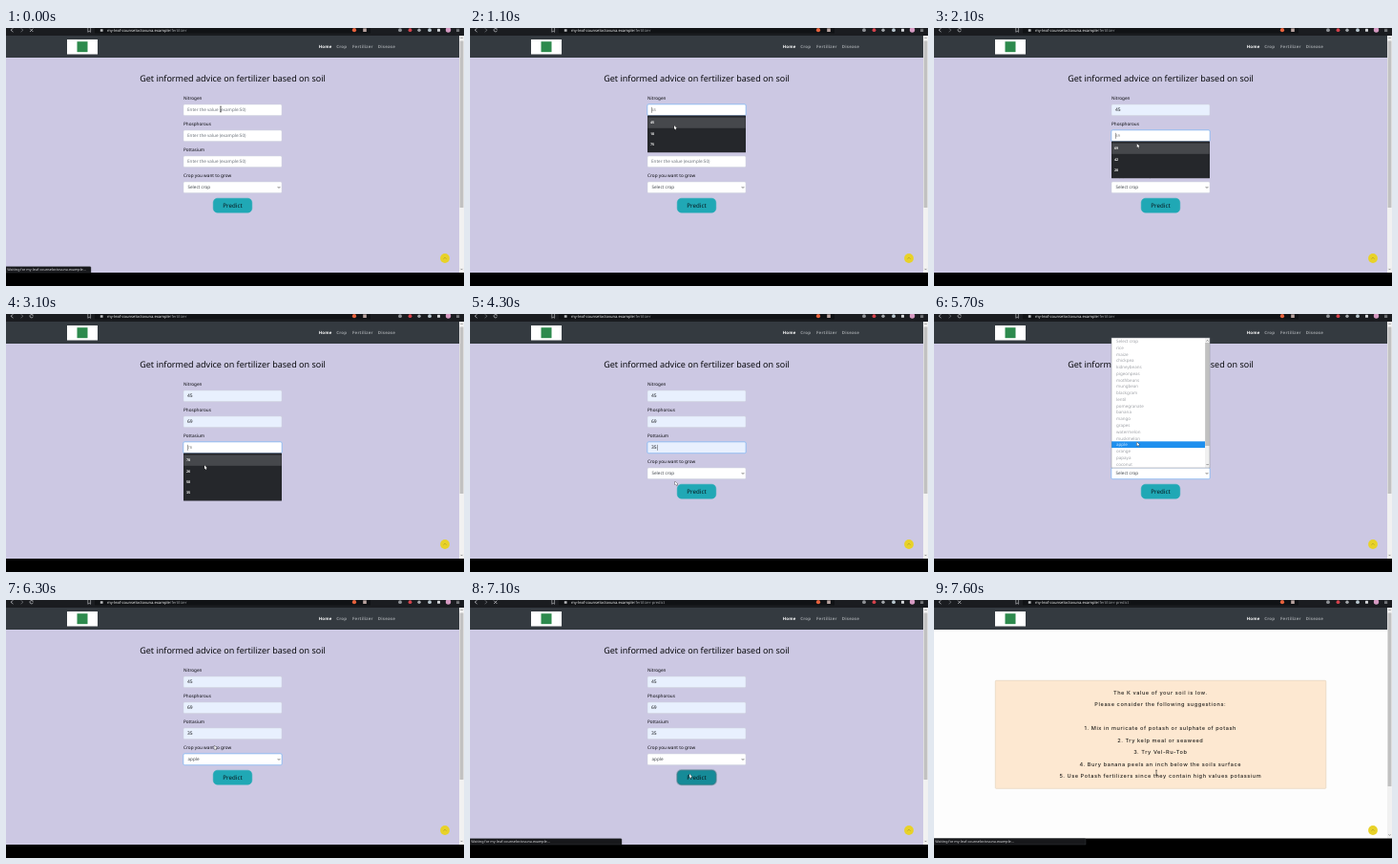
An HTML page with a canvas for the animation above (8 s loop, 480x270 px).

```html
<!DOCTYPE html>
<html lang="en">
<head>
<meta charset="utf-8">
<title>Fertilizer advice</title>
<style>
  html, body { margin: 0; width: 100%; height: 100%; overflow: hidden; background: #000; }
  canvas { display: block; width: 100vw; height: 100vh; }
</style>
</head>
<body>
<canvas id="stage"></canvas>
<script>
const W = 480, H = 270, LOOP = 8000, STEP = 100;
const SANS = '"Noto Sans", "Open Sans", sans-serif';
const WIDE = 'Inter, Roboto, sans-serif';
const HOST = 'my-leaf-counselor.tovuna.example';
const NAV_TOP = 8, PAGE_TOP = 31, PAGE_END = 256, RESULT_END = 249.5;

const canvas = document.getElementById('stage');
const ctx = canvas.getContext('2d');

// Moments at which the state of the page changes
const LOADED = 500, SELECT_FOCUS = 4900, SELECT_OPEN = 5000, CHOSEN = 6000;
const SELECT_BLUR = 6500, PRESSED = 6800, WAITING = 6900, RESULT = 7200;

const fields = [
  { label: 'Nitrogen', y: 80, open: 700, pick: 1400, blur: 1700, value: '45', options: ['45', '10', '75'] },
  { label: 'Phosphorous', y: 107, open: 1800, pick: 2300, blur: 2700, value: '69', options: ['69', '42', '20'] },
  { label: 'Pottasium', y: 134, open: 2800, pick: 3800, blur: 4900, value: '35', options: ['78', '26', '50', '35'] }
];

const crops = ('Select crop,rice,maize,chickpea,kidneybeans,pigeonpeas,mothbeans,mungbean,' +
  'blackgram,lentil,pomegranate,banana,mango,grapes,watermelon,muskmelon,apple,' +
  'orange,papaya,coconut').split(',');

const advice = [
  [97, 'The K value of your soil is low.'],
  [109.6, 'Please consider the following suggestions:'],
  [134.6, '1. Mix in muricate of potash or sulphate of potash'],
  [147.1, '2. Try kelp meal or seaweed'],
  [159.6, '3. Try Vel-Ru-Tob'],
  [172.1, '4. Bury banana peels an inch below the soils surface'],
  [184.6, '5. Use Potash fertilizers since they contain high values potassium']
];

// Pointer path: time, x, y
const path = [
  [0, 225, 85], [600, 225, 85], [1100, 214, 102], [1400, 213, 99], [1800, 214, 112],
  [2300, 212, 126], [2800, 212, 139], [3100, 208, 158.3], [3700, 206, 187], [3900, 206, 187],
  [4300, 215, 175], [4700, 222, 167], [5000, 222, 167], [5300, 214, 95], [5700, 212.6, 134],
  [6100, 212, 136], [6600, 230, 182], [7200, 230, 182], [7600, 233, 181]
];

function pointer(t) {
  const i = path.findIndex(p => p[0] > t);
  if (i < 0) return path[path.length - 1].slice(1);
  const [t0, x0, y0] = path[i - 1], [t1, x1, y1] = path[i];
  const k = (t - t0) / (t1 - t0), e = k * k * (3 - 2 * k);
  return [x0 + (x1 - x0) * e, y0 + (y1 - y0) * e];
}

const clamp = (v, max) => Math.max(0, Math.min(max, v));

function rect(x, y, w, h, fill) {
  ctx.fillStyle = fill;
  ctx.fillRect(x, y, w, h);
}

function box(x, y, w, h, r, fill, stroke, line = 0.5) {
  ctx.beginPath();
  ctx.roundRect(x, y, w, h, r);
  ctx.fillStyle = fill;
  ctx.fill();
  if (!stroke) return;
  ctx.strokeStyle = stroke;
  ctx.lineWidth = line;
  ctx.stroke();
}

function dot(x, y, r, fill) {
  ctx.beginPath();
  ctx.arc(x, y, r, 0, 7);
  ctx.fillStyle = fill;
  ctx.fill();
}

function lines(points, color, width, close) {
  ctx.beginPath();
  points.forEach(([x, y]) => ctx.lineTo(x, y));
  if (close) ctx.closePath();
  ctx.strokeStyle = color;
  ctx.lineWidth = width;
  ctx.stroke();
}

// Small arrow head centred on x, y; negative size points up
function chevron(x, y, size, color) {
  const w = Math.abs(size);
  lines([[x - w, y - size / 2], [x, y + size / 2], [x + w, y - size / 2]], color, 0.7);
}

// y is the middle of the letters
function text(s, x, y, size, color, { align = 'left', weight = 400, family = SANS, space = 0 } = {}) {
  ctx.font = `${weight} ${size}px ${family}`;
  ctx.letterSpacing = space + 'px';
  ctx.textAlign = align;
  ctx.fillStyle = color;
  ctx.fillText(s, x, y + size * 0.33);
  return ctx.measureText(s).width;
}

function toolbar(t) {
  rect(0, 0, W, NAV_TOP, '#1a1c20');
  rect(93, 0, 289, 5.5, '#101215');
  const ink = '#c9cbce';
  lines([[7.5, 0.3], [5, 2.2], [7.5, 4.1]], ink, 0.7);
  lines([[15.5, 0.3], [18, 2.2], [15.5, 4.1]], '#75787c', 0.7);
  if (t < LOADED || t >= WAITING) {
    lines([[25, 0.6], [28.4, 4]], ink, 0.7);
    lines([[28.4, 0.6], [25, 4]], ink, 0.7);
  } else {
    ctx.beginPath();
    ctx.arc(26.7, 2.2, 1.7, 0.3, 5.6);
    ctx.strokeStyle = ink;
    ctx.stroke();
    dot(28, 1.1, 0.6, ink);
  }
  lines([[85.8, 0], [85.8, 4.3], [87.2, 3.2], [88.6, 4.3], [88.6, 0]], ink, 0.6);
  box(98.8, 1.2, 2.8, 2.6, 0.3, '#b9bbbd');
  const w = text(HOST, 106, 2.2, 4.1, '#f0f1f2');
  text(t < WAITING ? '/fertilizer' : '/fertilizer-predict', 106 + w, 2.2, 4.1, '#9a9da1');
  dot(365, 2.2, 2.1, '#e8623c');
  rect(374.2, 0.4, 3.6, 3.6, '#b9a4a0');
  dot(413, 2.2, 1.9, '#8f9296');
  dot(423.5, 2.2, 1.9, '#d6424c');
  dot(433, 2.2, 1.7, '#a5a8ac');
  dot(444, 2.2, 1.9, '#b9c7cf');
  box(452, 0.8, 3, 3, 0.6, '#d7d9dc');
  dot(463.5, 2, 2.7, '#d69ac2');
  for (let i = 0; i < 3; i++) rect(472, 0.9 + i * 1.3, 3.2, 0.5, ink);
}

function navbar() {
  rect(0, NAV_TOP, 475, PAGE_TOP - NAV_TOP, '#343a40');
  rect(64, 12, 32, 15.5, '#fff');
  rect(74.5, 14.2, 11, 11, '#2d8a4d');
  const links = [['Home', 327.7], ['Crop', 346.2], ['Fertilizer', 363], ['Disease', 389.8]];
  links.forEach(([s, x], i) =>
    text(s, x, 20, 4.4, i ? '#9b9fa3' : '#fff', { weight: 700, space: 0.2 }));
}

function scrollbar(thumbEnd, end) {
  rect(475, NAV_TOP, 5, end - NAV_TOP, '#f1f1f1');
  rect(475.6, 13.5, 3.8, thumbEnd - 13.5, '#c1c1c1');
  chevron(477.5, 10.4, -1, '#666');
  chevron(477.5, end - 3.6, 1, '#666');
}

function input(y, focused, filled) {
  if (focused) box(185.3, y - 0.7, 104.4, 13, 2, '#a6c8f4');
  box(186, y, 103, 11.6, 1.4, filled ? '#e8f0fe' : '#fff', focused ? '#80aeea' : '#cfd3dc');
}

function caret(x, y, t) {
  if (t % 1000 < 600) rect(x, y + 2.8, 0.5, 6, '#444');
}

const rowAt = (f, y) => clamp(Math.floor((y - f.y - 13.5) / 11.2), f.options.length - 1);

function field(f, t, py) {
  const focused = t >= f.open && t < f.blur, picked = t >= f.pick;
  const mid = f.y + 5.8;
  text(f.label, 186, f.y - 6.7, 4.65, '#08090c', { weight: 500 });
  input(f.y, focused, picked);
  if (picked) {
    text(f.value, 190, mid, 4.9, '#16181c', { weight: 500 });
    if (focused) caret(196, f.y, t);
  } else if (focused) {
    text(f.options[rowAt(f, py)], 190.6, mid, 3.8, '#777');
    caret(190, f.y, t);
  } else {
    text('Enter the value (example:50)', 190, mid, 4.6, '#6c737b');
  }
}

function suggestions(f, py) {
  const top = f.y + 11.4, first = f.y + 13.6, n = f.options.length;
  box(186, top, 103, n * 11.2 + 5.3, 0.6, '#25272b');
  rect(186.3, first + rowAt(f, py) * 11.2, 102.4, 11.2, '#46484c');
  f.options.forEach((s, i) =>
    text(s, 189, first + 5.6 + i * 11.2, 3.7, '#f2f2f2', { weight: 700 }));
}

function cropList(py) {
  const top = 25, pitch = 6.77;
  const hover = clamp(Math.floor((py - top) / pitch), crops.length - 1);
  rect(186, top, 103, 136, '#fff');
  crops.forEach((s, i) => {
    if (i === hover) rect(186, top + i * pitch, 98.3, pitch, '#1e8fee');
    text(s, 191, top + 3.5 + i * pitch, 4.5, i === hover ? '#c4e2ff' : '#a0a3a8');
  });
  rect(284, top, 5, 136, '#f0f0f0');
  rect(284.2, 30, 4.6, 108, '#c1c1c1');
  chevron(286.6, 28, -1, '#555');
  chevron(286.6, 157.6, 1, '#555');
  ctx.strokeStyle = '#868a92';
  ctx.lineWidth = 0.5;
  ctx.strokeRect(186, top, 103, 136);
}

function form(t, py) {
  rect(0, PAGE_TOP, 475, PAGE_END - PAGE_TOP, '#ccc8e3');
  text('Get informed advice on fertilizer based on soil', 237.5, 53, 9.03, '#08090c', { align: 'center' });
  fields.forEach(f => field(f, t, py));
  text('Crop you want to grow', 186, 154.4, 4.7, '#08090c', { weight: 500 });
  input(161, t >= SELECT_FOCUS && t < SELECT_BLUR, false);
  text(t < CHOSEN ? 'Select crop' : 'apple', 190.5, 166.8, 4.6, '#42474d');
  chevron(286, 166.8, 1.2, '#333');

  const down = t >= PRESSED;
  if (down) box(216.2, 177.2, 42.6, 17, 5, '#8fa6b8');
  box(217.2, 178.2, 40.6, 15, 4.5, down ? '#168b98' : '#20a8b5', down ? '#2b6f7d' : '#20a8b5');
  text('Predict', 237.5, 185.5, 6.2, '#08171d', { align: 'center', weight: 500 });

  const open = fields.find(f => t >= f.open && t < f.pick);
  if (open) suggestions(open, py);
}

function result() {
  rect(0, PAGE_TOP, 475, RESULT_END - PAGE_TOP, '#fdfdfd');
  box(64.3, 84.3, 346.5, 113, 0.8, '#fde8d1', '#e6d4bd', 0.7);
  advice.forEach(([y, s]) =>
    text(s, 237.3, y, 5.6, '#24221f', { align: 'center', weight: 500, family: WIDE, space: 0.56 }));
}

function toTop() {
  dot(460, 241, 4.9, '#e8d228');
  chevron(460, 240.9, -1.6, '#b09c28');
}

function status(width) {
  box(-2, 249.7, width + 2, PAGE_END - 249.7, [0, 1, 0, 0], '#17181b', '#3c3e42', 0.4);
  text(`Waiting for ${HOST}...`, 1.2, 253.2, 3.7, '#dcdde0');
}

function cursor(t, x, y) {
  if (t < 700 || t >= RESULT) {
    lines([[x, y - 2.8], [x, y + 2.8]], '#222', 0.6);
    for (const end of [-2.8, 2.8]) lines([[x - 1, y + end], [x + 1, y + end]], '#222', 0.5);
    return;
  }
  const shape = [[0, 0], [0, 4], [0.9, 3.2], [1.6, 4.6], [2.2, 4.3], [1.6, 3], [2.8, 2.9]];
  lines(shape.map(([a, b]) => [x + a, y + b]), '#222', 0.6, true);
  ctx.fillStyle = '#fff';
  ctx.fill();
}

function draw(t) {
  const [x, y] = pointer(t);
  const done = t >= RESULT;
  rect(0, 0, W, H, '#000');
  if (done) result(); else form(t, y);
  navbar();
  if (t >= SELECT_OPEN && t < CHOSEN) cropList(y);
  scrollbar(done ? 195 : 188, done ? RESULT_END : PAGE_END);
  toolbar(t);
  toTop();
  if (t < LOADED) status(89);
  if (t >= WAITING) status(159);
  cursor(t, x, y);
}

function resize() {
  const d = window.devicePixelRatio || 1;
  canvas.width = Math.round(innerWidth * d);
  canvas.height = Math.round(innerHeight * d);
}

const start = performance.now();
function tick() {
  const t = Math.max(0, performance.now() - start) % LOOP;
  ctx.setTransform(canvas.width / W, 0, 0, canvas.height / H, 0, 0);
  ctx.textRendering = 'geometricPrecision';
  draw(Math.floor(t / STEP) * STEP);
  requestAnimationFrame(tick);
}

addEventListener('resize', resize);
resize();
tick();
</script>
</body>
</html>
```
